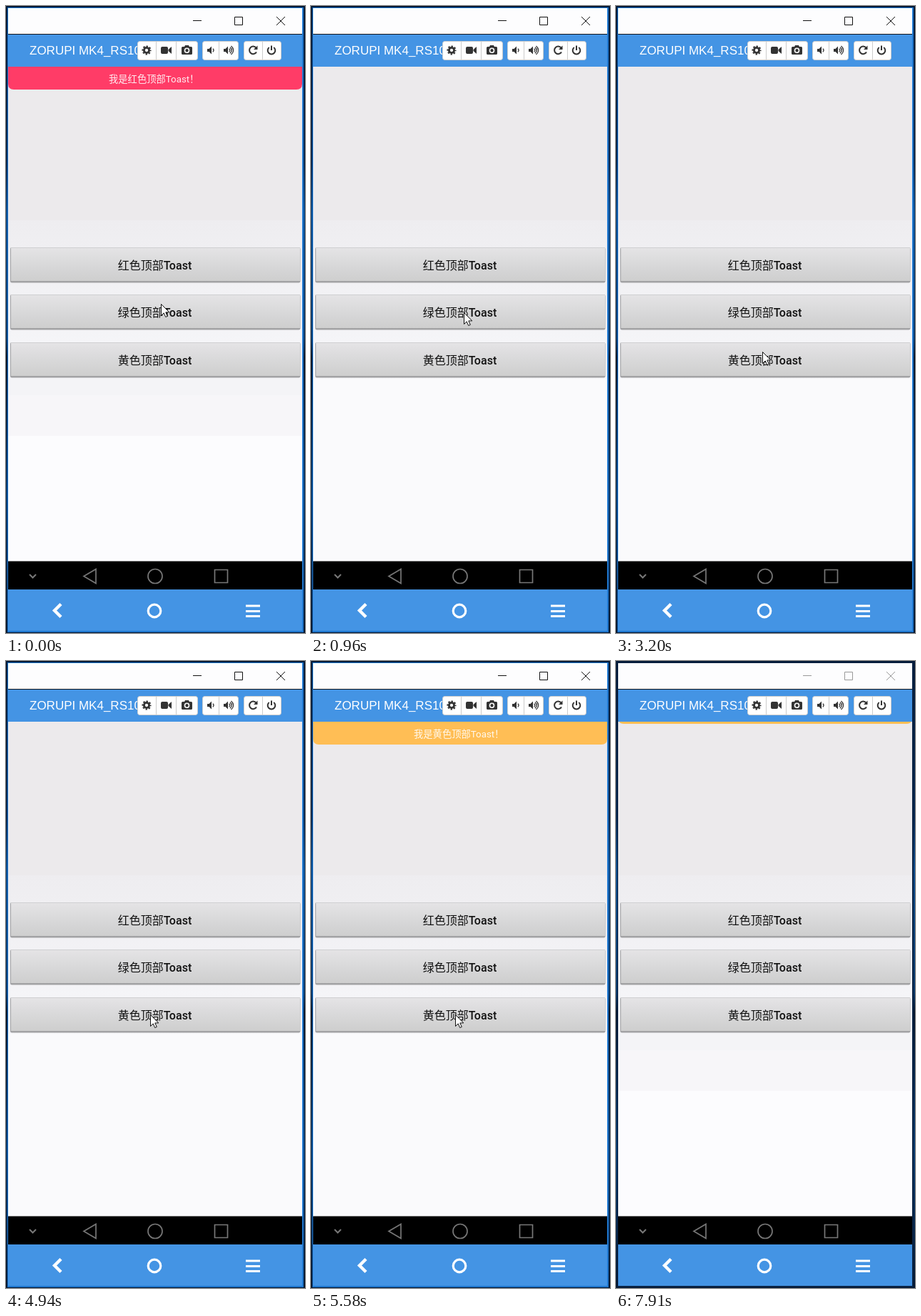
Write an HTML page that moves like this. It is 419 px wide and 878 px high and loops after 8010 ms.

```html
<!DOCTYPE html>
<html lang="zh">
<head>
<meta charset="utf-8">
<title>Top toast demo</title>
<style>
  html, body { margin: 0; width: 100%; height: 100%; overflow: hidden; }
  svg { display: block; }
  rect { shape-rendering: crispEdges; }
  .smooth { shape-rendering: auto; }
  .line { fill: none; }
  .title { font: 17px "Liberation Sans", Arial, sans-serif; fill: #fff; }
  .label { font: 500 16px Roboto, "Noto Sans CJK SC", "Noto Sans CJK", sans-serif; fill: #111; text-anchor: middle; }
  #toastText { font: 13.3px Roboto, "Noto Sans CJK SC", "Noto Sans CJK", sans-serif; fill: #fff; fill-opacity: .9; }
</style>
</head>
<body>
<svg width="419" height="878" viewBox="0 0 419 878">
  <defs>
    <linearGradient id="desktop" x2="0" y2="1">
      <stop offset="0" stop-color="#041a38"/>
      <stop offset=".25" stop-color="#06264f"/>
      <stop offset=".33" stop-color="#0a4a8c"/>
      <stop offset=".53" stop-color="#073567"/>
      <stop offset=".56" stop-color="#03142c"/>
      <stop offset=".78" stop-color="#073a70"/>
      <stop offset="1" stop-color="#04162f"/>
    </linearGradient>
    <linearGradient id="middle" x2="0" y2="1">
      <stop offset="0" stop-color="#eeedf0"/>
      <stop offset="1" stop-color="#f7f7fa"/>
    </linearGradient>
    <linearGradient id="key" x2="0" y2="1">
      <stop offset="0" stop-color="#e5e4e6"/>
      <stop offset=".5" stop-color="#d9d9da"/>
      <stop offset="1" stop-color="#cecece"/>
    </linearGradient>
    <clipPath id="screen"><rect x="3" y="85" width="412" height="692"/></clipPath>
  </defs>

  <!-- window -->
  <rect width="419" height="878" fill="url(#desktop)"/>
  <rect id="border" x="2" y="2" width="415" height="875"/>
  <rect x="3" y="3" width="412" height="36" fill="#fdfdfe"/>
  <rect x="3" y="39" width="412" height="1" fill="#14161a"/>
  <path id="windowIcons" class="line" d="M262 20.5h12M320.5 15.5h11v11h-11zM379 15l12 12M391 15l-12 12"/>

  <!-- header -->
  <rect x="3" y="40" width="412" height="45" fill="#4494e4"/>
  <text class="title" x="33" y="68">ZORUPI MK4_RS10</text>
  <g id="toolbar"></g>
  <g fill="#333" stroke="#333" stroke-width="0">
    <circle class="line" cx="197" cy="62" r="3.6" stroke-width="2.9"/>
    <circle class="line" cx="197" cy="62" r="5.6" stroke-width="2" stroke-dasharray="2.4 2" stroke-dashoffset="1.2"/>
    <path d="M219 57h6q2 0 2 2v6q0 2-2 2h-6q-2 0-2-2v-6q0-2 2-2zM227.5 61l4.5-4v10l-4.5-4z"/>
    <path d="M247.5 57h2.5l1-2h5l1 2h2.500q1.500 0 1.500 1.500v8q0 1.500-1.500 1.500h-12q-1.500 0-1.500-1.500v-8q0-1.500 1.500-1.500z"/>
    <circle cx="253.500" cy="62.300" r="3" fill="#333" stroke="#fff" stroke-width="1.600"/>
    <path d="M282 60h2.500l3.500-3.500v11l-3.500-3.500H282zM305 60h2.500l3.500-3.500v11l-3.500-3.500H305z"/>
    <path class="line" stroke-width="1.300" d="M289.800 59.800q2.600 2.200 0 4.400M312.600 59.800q2.600 2.200 0 4.400M314 57.800q4.600 4.200 0 8.400M315.500 56q6.400 6 0 12"/>
    <path class="line" stroke-width="2" d="M350.500 58.500a5.300 5.300 0 1 0 .5 6M368.800 58a5.300 5.300 0 1 0 6.400 0M372 55.500v6.500"/>
    <path d="M352.500 55.500v5.500H347z"/>
  </g>

  <!-- phone screen -->
  <g clip-path="url(#screen)">
    <rect x="3" y="85" width="412" height="692" fill="#fafafc"/>
    <rect id="upper" x="3" y="85" width="412" height="215"/>
    <rect x="3" y="300" width="412" height="222" fill="url(#middle)"/>
    <g id="bands">
      <rect x="3" y="520" width="412" height="25" fill="#f4f4f7"/>
      <rect x="3" y="545" width="412" height="57" fill="#f7f6f9"/>
      <rect x="3" y="602" width="412" height="175" fill="#fcfcfe"/>
    </g>
    <g id="keys"></g>
    <g id="toast">
      <path id="toastBox" d="M3 85h412v24q0 8-8 8H11q-8 0-8-8z"/>
      <text id="toastText" x="144" y="106.500"></text>
    </g>
  </g>

  <!-- navigation bars -->
  <rect x="3" y="777" width="412" height="1" fill="#777"/>
  <rect x="3" y="778" width="412" height="39" fill="#000"/>
  <g class="line" stroke="#777" stroke-width="1.700">
    <path d="M33 796l4.500 4.500L42 796" stroke-width="2"/>
    <path d="M109 798.500l17-10v20z"/>
    <circle cx="209" cy="798.500" r="10"/>
    <path d="M292.500 789.500h18v18h-18z"/>
  </g>
  <rect x="3" y="817" width="412" height="58" fill="#4494e4"/>
  <rect id="hover" x="277" y="817" width="138" height="58" fill="#316592"/>
  <g class="line" stroke="#fff">
    <path d="M77 837.500l-9 9 9 9" stroke-width="4.500"/>
    <circle cx="208" cy="847" r="8.800" stroke-width="3.200"/>
    <path d="M336 840h20M336 847.500h20M336 854.500h20" stroke-width="3.200"/>
  </g>

  <path id="cursor" d="M.5.5v16l3.700-3.600 2.500 5.600 2.600-1.100-2.500-5.500h5z" fill="#fff" stroke="#111"/>
</svg>

<script>
const LOOP = 8010;
const $ = id => document.getElementById(id);

// toolbar groups: left, right, dividers
$('toolbar').innerHTML = [[184, 269, 210, 238], [275, 326, 298], [333, 386, 359]]
  .map(([left, right, ...dividers]) =>
    `<rect class="smooth" x="${left + .5}" y="49.500" width="${right - left - 1}" height="26" rx="3" fill="#fff" stroke="#ccc"/>` +
    dividers.map(x => `<rect x="${x}" y="50" width="1" height="25" fill="#ccc"/>`).join(''))
  .join('');

$('keys').innerHTML = ['红', '绿', '黄'].map((name, i) => {
  const y = [338, 404, 471][i];
  return `<rect class="smooth" x="6" y="${y}" width="406.500" height="49.500" rx="2" fill="#a2a2a4"/>
    <rect x="7" y="${y}" width="405" height="47" fill="url(#key)"/>
    <rect x="7" y="${y}" width="405" height="1" fill="#cfcfd1"/>
    <text class="label" x="208.500" y="${y + 30.500}">${name}色顶部Toast</text>`;
}).join('');

const RED = ['#ff3c67', '红'], GREEN = ['#7ad320', '绿'], YELLOW = ['#ffbe55', '黄'];

// time, style, vertical offset
const toastPoses = [
  [0, RED, 0], [290, RED, -7], [410, RED, -24], [530, RED, -34],
  [1090, GREEN, -12], [1240, GREEN, 0], [2950, GREEN, -7], [3080, GREEN, -24], [3200, GREEN, -34],
  [5310, YELLOW, -20], [5430, YELLOW, -5], [5580, YELLOW, 0], [7330, YELLOW, -14], [7480, YELLOW, -29],
];

// time, tip x, tip y
const cursorPoses = [
  [0, 217, 417], [150, 214, 429], [1680, 212, 429], [1950, 219, 431], [2100, 219, 432],
  [2250, 218, 435], [2380, 217, 439], [2520, 216, 447], [2650, 214, 456], [2800, 211, 461],
  [2950, 209, 468], [3080, 207, 477], [3200, 205, 484], [3350, 202, 495], [6450, 204, 494],
  [6910, 204, 512], [7050, 262, 680], [7180, 317, 831], [7330, 325, 829], [7480, 350, 849],
  [7630, 500, 900],
];

const poseAt = (poses, t) => poses.findLast(([start]) => start <= t);
const show = (id, visible) => $(id).setAttribute('visibility', visible ? 'visible' : 'hidden');

function draw(t) {
  const [, [color, name], offset] = poseAt(toastPoses, t);
  $('toast').setAttribute('transform', `translate(0 ${offset})`);
  $('toastBox').setAttribute('fill', color);
  $('toastText').textContent = `我是${name}色顶部Toast！`;

  const [, x, y] = poseAt(cursorPoses, t);
  $('cursor').setAttribute('transform', `translate(${x} ${y})`);

  const active = t < 7910;
  $('border').setAttribute('fill', active ? '#1f78d1' : '#0a2344');
  $('windowIcons').setAttribute('stroke', active ? '#111' : '#999');
  $('upper').setAttribute('fill', t >= 1240 && t < 2950 ? '#e9e9e9' : '#eceaec');
  show('bands', t < 290 || t >= 7050);
  show('hover', t >= 7180 && t < 7630);
}

function tick() {
  draw(performance.now() % LOOP);
  requestAnimationFrame(tick);
}
tick();
</script>
</body>
</html>
```
